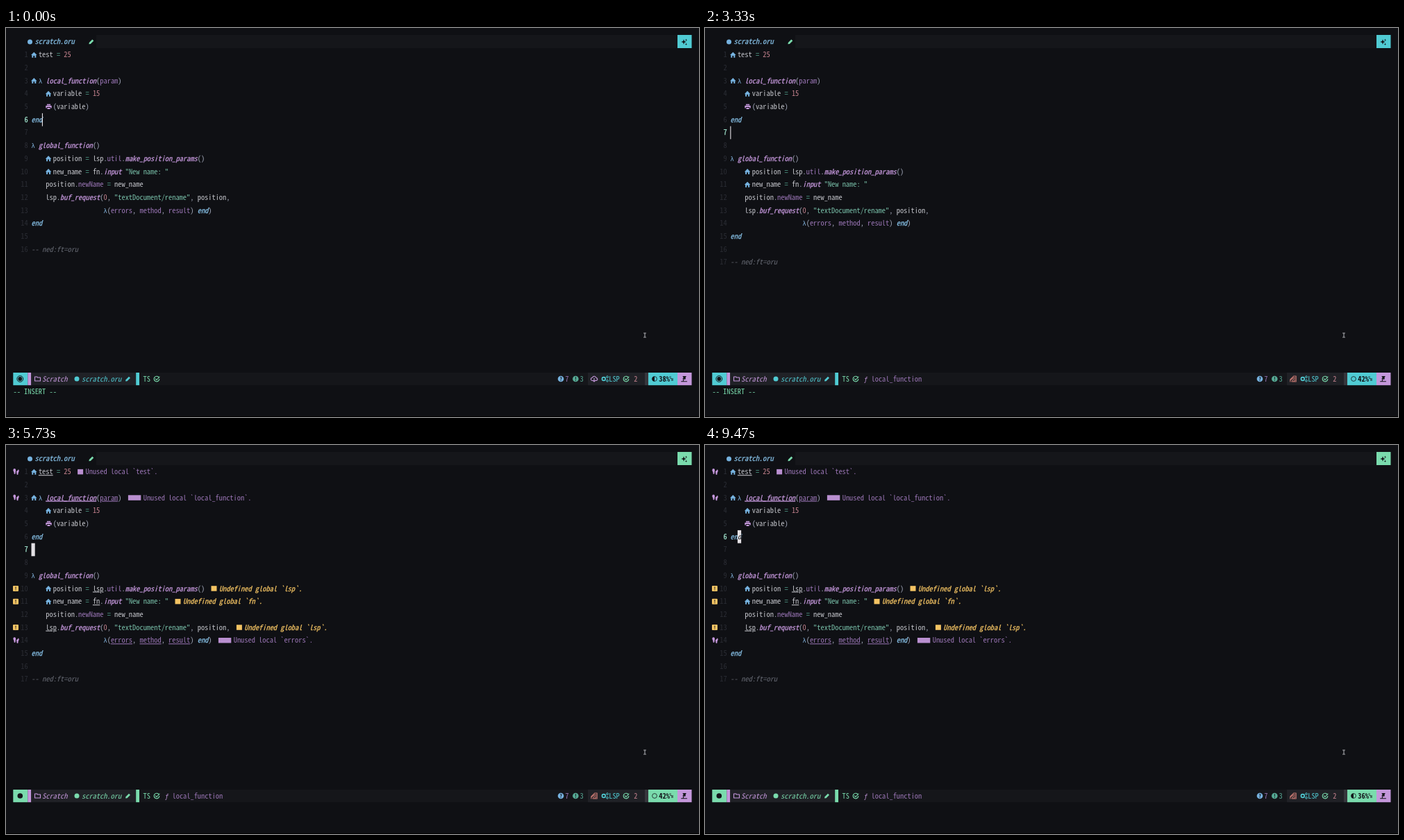
Write an HTML page that moves like this. It is 998x561 px and loops after 9.54 s.

```html
<!DOCTYPE html>
<html lang="en">
<head>
<meta charset="utf-8">
<title>Editor session</title>
<style>
html, body { margin: 0; width: 100%; height: 100%; overflow: hidden; background: #0f1014; }
svg { display: block; width: 100vw; height: 100vh; }
text { white-space: pre; font-family: "Noto Sans Mono CJK JP", "Noto Sans Mono", monospace; fill: #c4c5cb; }
.insert { --mode: #50cbd3; }
.normal { --mode: #7adbad; }
.mode { fill: var(--mode); }
.op { fill: #56a994; }
.num { fill: #c78490; }
.str { fill: #78bfa8; }
.par { fill: #9a75b5; }
.pale { fill: #a2a8b9; }
.fn, .key, .warn { font-style: italic; stroke-width: .25px; }
.fn { fill: #c497db; stroke: #c497db; }
.key { fill: #86bfe5; stroke: #86bfe5; }
.warn { fill: #f3c363; stroke: #f3c363; }
.lam { fill: #83b4df; font-family: "DejaVu Sans Mono", monospace; font-size: 8.6px; }
.com { fill: #666973; font-style: italic; }
.no { fill: #2b2d35; }
.now { fill: #a5ead3; stroke: #a5ead3; stroke-width: .25px; }
.hint { fill: #9a75b5; }
.it { font-style: italic; }
.bold { font-weight: bold; }
.diag .u { text-decoration: underline; }
.blue { fill: #76b2df; }
.violet { fill: #c497db; }
.green { fill: #7adbad; }
.dark { fill: #14161b; }
.line { fill: none; stroke-width: 1.1; stroke-linecap: round; stroke-linejoin: round; }
</style>
</head>
<body>
<svg id="stage" viewBox="0 0 998 561" preserveAspectRatio="none"></svg>
<script>
const stage = document.getElementById('stage');
const LOOP = 9540, CELL = 5.2, LEFT = 36.5, PITCH = 18.7;
const colX = c => LEFT + c * CELL;
const rowY = r => 38.7 + (r - 1) * PITCH;

// Choose the size at which one character fills one cell.
const ctx = document.createElement('canvas').getContext('2d');
ctx.font = '100px "Noto Sans Mono CJK JP", "Noto Sans Mono", monospace';
const fontSize = CELL * 100 / ctx.measureText('0').width;

const text = (x, y, cls, s, extra = '') =>
  `<text x="${x}" y="${y + 3.5}" class="${cls}" ${extra}>${s}</text>`;
const rect = (x, y, w, h, fill) => `<rect x="${x}" y="${y}" width="${w}" height="${h}" fill="${fill}"/>`;
const dot = (x, y, r, cls) => `<circle cx="${x}" cy="${y}" r="${r}" class="${cls}"/>`;
const ring = (x, y, r, color, width) =>
  `<circle cx="${x}" cy="${y}" r="${r}" fill="none" stroke="${color}" stroke-width="${width}"/>`;
const path = (x, y, d, cls, extra = '') =>
  `<path transform="translate(${x} ${y})" d="${d}" class="${cls}" ${extra}/>`;
const stroke = (x, y, d, color) => path(x, y, d, 'line', `stroke="${color}"`);

const home = (x, y) => path(x, y, 'M-4.3 .4L0-4 4.3.4H3V4H1V1.2H-1V4H-3V.4Z', 'blue');
const printer = (x, y) => path(x, y,
  'M-2.6-3.8H2.6V-2H-2.6ZM-4.2-1.5H4.2V2H2.7V.6H-2.7V2H-4.2ZM-2 1.4H2V3.6H-2Z', 'violet');
const pencil = (x, y, cls) => path(x, y, 'M-3.6 3.6L-3.2 1.2 1.3-3.3 3.3-1.3-1.2 3.2Z', cls);
const check = (x, y) => stroke(x, y, 'M3.2-2A3.8 3.8 0 1 0 3.8.4M-1.7-.2L0 1.5 4-2.8', '#7adbad');
const badge = (x, y, cls, s) =>
  dot(x, y, 4.3, cls) + text(x, y - .6, 'dark bold', s, 'text-anchor="middle" style="font-size:7.5px"');
const foot = (x, y, side) => path(x, y,
  `M${-1.9 * side}-1.6Q${-1.8 * side}-4 0-4 2.1-4 ${1.9 * side}-1 ${1.6 * side} 1.2 ${1.4 * side} 2.6 ${1.2 * side} 4 0 3.8 ${-1 * side} 3.4 ${-.6 * side} 1.6Z`, 'violet');
const feet = (x, y) => foot(x - 2.3, y - .6, 1) + foot(x + 2.4, y + .4, -1);
const warnSign = (x, y) =>
  `<rect x="${x - 4}" y="${y - 4}" width="8" height="8" rx="1" fill="#f3c363"/>` +
  rect(x - .5, y - 2.6, 1, 3.2, '#14161b') + rect(x - .5, y + 1.4, 1, 1.1, '#14161b');

// Each code line: tokens [column, class, text], icons, and an optional notice.
const hint = (col, name, count = 1) => ({ col, count, cls: 'hint', msg: `Unused local \`${name}\`.` });
const warn = (col, name) => ({ col, count: 1, cls: 'warn', msg: `Undefined global \`${name}\`.` });
const code = [
  { home: 0, t: [[2, 'u', 'test'], [7, 'op', '='], [9, 'num', '25']], note: hint(13, 'test') },
  {},
  { home: 0, t: [[2, 'lam', 'λ'], [4, 'fn u', 'local_function'], [18, 'pale', '('], [19, 'par u', 'param'], [24, 'pale', ')']],
    note: hint(27, 'local_function', 3) },
  { home: 4, t: [[6, '', 'variable'], [15, 'op', '='], [17, 'num', '15']] },
  { print: 4, t: [[6, 'pale', '('], [7, '', 'variable'], [15, 'pale', ')']] },
  { t: [[0, 'key', 'end']] },
  {},
  { t: [[0, 'lam', 'λ'], [2, 'fn', 'global_function'], [17, 'pale', '()']] },
  { home: 4, t: [[6, '', 'position'], [15, 'op', '='], [17, 'u', 'lsp'], [20, 'pale', '.'], [21, 'par', 'util'],
    [25, 'pale', '.'], [26, 'fn', 'make_position_params'], [46, 'pale', '()']], note: warn(50, 'lsp') },
  { home: 4, t: [[6, '', 'new_name'], [15, 'op', '='], [17, 'u', 'fn'], [19, 'pale', '.'], [20, 'fn', 'input'],
    [26, 'str', '"New name: "']], note: warn(40, 'fn') },
  { t: [[4, '', 'position'], [12, 'pale', '.'], [13, 'par', 'newName'], [21, 'op', '='], [23, '', 'new_name']] },
  { t: [[4, 'u', 'lsp'], [7, 'pale', '.'], [8, 'fn', 'buf_request'], [19, 'pale', '('], [20, 'num', '0'], [21, 'pale', ','],
    [23, 'str', '"textDocument/rename"'], [44, 'pale', ','], [46, '', 'position'], [54, 'pale', ',']], note: warn(57, 'lsp') },
  { t: [[20, 'lam', 'λ'], [21, 'pale', '('], [22, 'par u', 'errors'], [28, 'pale', ','], [30, 'par u', 'method'],
    [36, 'pale', ','], [38, 'par u', 'result'], [44, 'pale', ')'], [46, 'key', 'end'], [49, 'pale', ')']],
    note: hint(52, 'errors', 3) },
  { t: [[0, 'key', 'end']] },
  {},
  { t: [[0, 'com', '-- ned:ft=oru']] }
];

// [start ms, mode, added lines, cursor row, flags: d notices, w word highlight, c breadcrumb]
const timeline = [
  [0, 'insert', 0, 6, ''],
  [70, 'normal', 0, 6, ''],
  [470, 'normal', 0, 6, 'd'],
  [730, 'normal', 0, 6, 'dwc'],
  [1670, 'insert', 1, 7, 'c'],
  [2330, 'insert', 2, 8, 'c'],
  [3330, 'insert', 1, 7, 'c'],
  [3530, 'insert', 0, 6, 'c'],
  [3930, 'normal', 0, 6, 'dc'],
  [4130, 'normal', 0, 6, 'dwc'],
  [4470, 'insert', 1, 7, 'c'],
  [5670, 'normal', 1, 7, 'dc'],
  [6400, 'normal', 0, 6, 'dwc'],
  [7200, 'normal', 1, 6, 'dc'],
  [8130, 'insert', 1, 6, 'c'],
  [9470, 'normal', 1, 6, 'dc']
];

function codeLine(line, y, notices) {
  let out = '';
  if ('home' in line) out += home(colX(line.home) + 3.8, y);
  if ('print' in line) out += printer(colX(line.print) + 4.2, y);
  for (const [col, cls, s] of line.t || []) out += text(colX(col), y, cls, s);
  if (notices && line.note) {
    const { col, count, cls, msg } = line.note;
    const isHint = cls === 'hint';
    out += isHint ? feet(14.5, y) : warnSign(14, y);
    out += rect(colX(col) - 1, y - 3.8, 8 + (count - 1) * CELL, 7.5, isHint ? '#b98fd0' : '#f3c363');
    out += text(colX(col + count + 1), y, cls, msg);
  }
  return out;
}

function editor(mode, added, row, flags) {
  const lines = [...code.slice(0, 6), ...Array(added).fill({}), ...code.slice(6)];
  const notices = flags.includes('d');
  const insert = mode === 'insert';
  const y = rowY(row);
  let out = flags.includes('w') ? rect(colX(0), y - 9.3, 2 * CELL, PITCH, '#25282f') : '';
  lines.forEach((line, i) => {
    const n = i + 1;
    out += codeLine(line, rowY(n), notices);
    out += text(31.6, rowY(n), n === row ? 'now' : 'no', n, 'text-anchor="end"');
  });
  const col = row > 6 ? 0 : insert ? 3 : 2;
  out += rect(colX(col) - (insert ? .2 : 0), y - 9.3, insert ? 1.1 : CELL, PITCH, '#e4e1e5');
  if (!insert && row === 6) out += text(colX(2), y, 'dark it', 'd');
  return { out, percent: Math.ceil(row * 100 / lines.length) };
}

function tabBar() {
  return rect(130, 10, 837, 19, '#15161a') + dot(34.5, 20, 3.5, 'blue') +
    text(41.5, 19.8, 'key', 'scratch.oru') + pencil(123, 19.7, 'green') +
    rect(967, 10, 20.5, 19, 'var(--mode)') +
    path(976, 20, 'M0-3.8L1-1 3.8 0 1 1 0 3.8-1 1-3.8 0-1-1ZM3.5-4.5L4-3 5.3-2.6 4-2.2 3.5-1 3-2.2 1.9-2.6 3-3ZM3.4 1.7L4 3 5.2 3.4 4 3.8 3.4 5 2.9 3.8 1.8 3.4 2.9 3Z', 'dark');
}

function statusBar(mode, percent, crumb) {
  const y = 506, insert = mode === 'insert';
  const bars = [[10.3, 21, 'var(--mode)'], [31.3, 5, '#c497db'], [36.3, 151, '#202126'], [187.2, 5, 'var(--mode)'],
    [192.2, 646, '#15161a'], [838, 82, '#202126'], [920, 5, '#36363c'], [925, 42, 'var(--mode)'], [967, 20.5, '#c497db']];
  let out = bars.map(([x, w, fill]) => rect(x, 497, w, 18.2, fill)).join('');
  out += insert ? ring(20.3, y, 4.4, '#14161b', 1) + dot(20.3, y, 2.9, 'dark') : dot(20.3, y, 3.8, 'dark');
  out += stroke(45.5, y, 'M-4-3H-1L0-2H4V3H-4Z', '#c497db') + text(52, y, 'violet it', 'Scratch');
  out += dot(102, y, 3.5, 'mode') + text(109, y, 'mode it', 'scratch.oru') + pencil(175.7, y, 'mode');
  out += text(197.5, y, 'green', 'TS') + check(217, y);
  if (crumb) {
    out += text(229, y, 'lam it', 'ƒ', 'style="fill:#c497db"') + text(239.5, y, 'hint', 'local_function');
  }
  out += badge(799, y, 'blue', '?') + text(805.3, y, 'hint', '7');
  out += badge(820.3, y, 'op', '!') + text(826.5, y, 'op', '3');
  out += crumb
    ? stroke(847, y, 'M-4.2 4V1L1-4H4.2V4H-1M-4 2Q0-2 3-2M-2 4Q0 0 3 0M0 4L3 2', '#c27670')
    : stroke(847, y, 'M-2 2.5H-3Q-5 2-4.7 0-4.2-1.7-2.6-1.8-1.8-4 .4-3.8 2.5-3.4 3-1.4 5-1 4.8 1 4.3 2.5 2 2.5M0-1V4M-1.6 2.4L0 4 1.6 2.4', '#c497db');
  out += ring(860.8, y, 2.4, '#50cbd3', 1.6) + ring(866, y - 2.7, 1.4, '#50cbd3', 1) + ring(866, y + 2.7, 1.4, '#50cbd3', 1);
  out += text(868.2, y, '', 'LSP', 'style="fill:#50cbd3"') + check(893, y) + text(904.3, y, 'num', '2');
  out += ring(934, y, 3.4, '#14161b', .8);
  if (percent < 40) out += path(934, y, 'M0-3.6A3.6 3.6 0 0 0 0 3.6Z', 'dark');
  out += text(940.3, y, 'dark bold', percent + '%');
  out += text(956.2, y - 3.2, 'dark bold', 'L', 'style="font-size:5px"') +
    text(958.3, y - .2, 'dark bold', 'N', 'style="font-size:5px"');
  out += path(976.5, y, 'M-2-4H3V-3L2-2 2.4.6H-2.4L-.8-2-1.8-3Z', 'dark') +
    stroke(976.5, y, 'M-.4 .6L-1.6 3.6M-4 3.8H4', '#14161b');
  return out;
}

function draw([, mode, added, row, flags]) {
  const { out, percent } = editor(mode, added, row, flags);
  stage.setAttribute('class', mode + (flags.includes('d') ? ' diag' : ''));
  stage.innerHTML = rect(0, 0, 998, 561, '#0f1014') + rect(0, 560, 998, 1, '#000') +
    `<g style="font-size:${fontSize}px">` + tabBar() + out + statusBar(mode, percent, flags.includes('c')) +
    (mode === 'insert' ? text(10.5, 524.8, 'green', '-- INSERT --') : '') + '</g>' +
    stroke(920, 443, 'M-1.5-3H1.5M0-3V3M-1.5 3H1.5', '#a7a8ad');
}

let shown;
function tick() {
  const time = performance.now() % LOOP;
  const state = timeline.findLast(s => s[0] <= time);
  if (state !== shown) draw(shown = state);
  requestAnimationFrame(tick);
}
tick();
</script>
</body>
</html>
```
